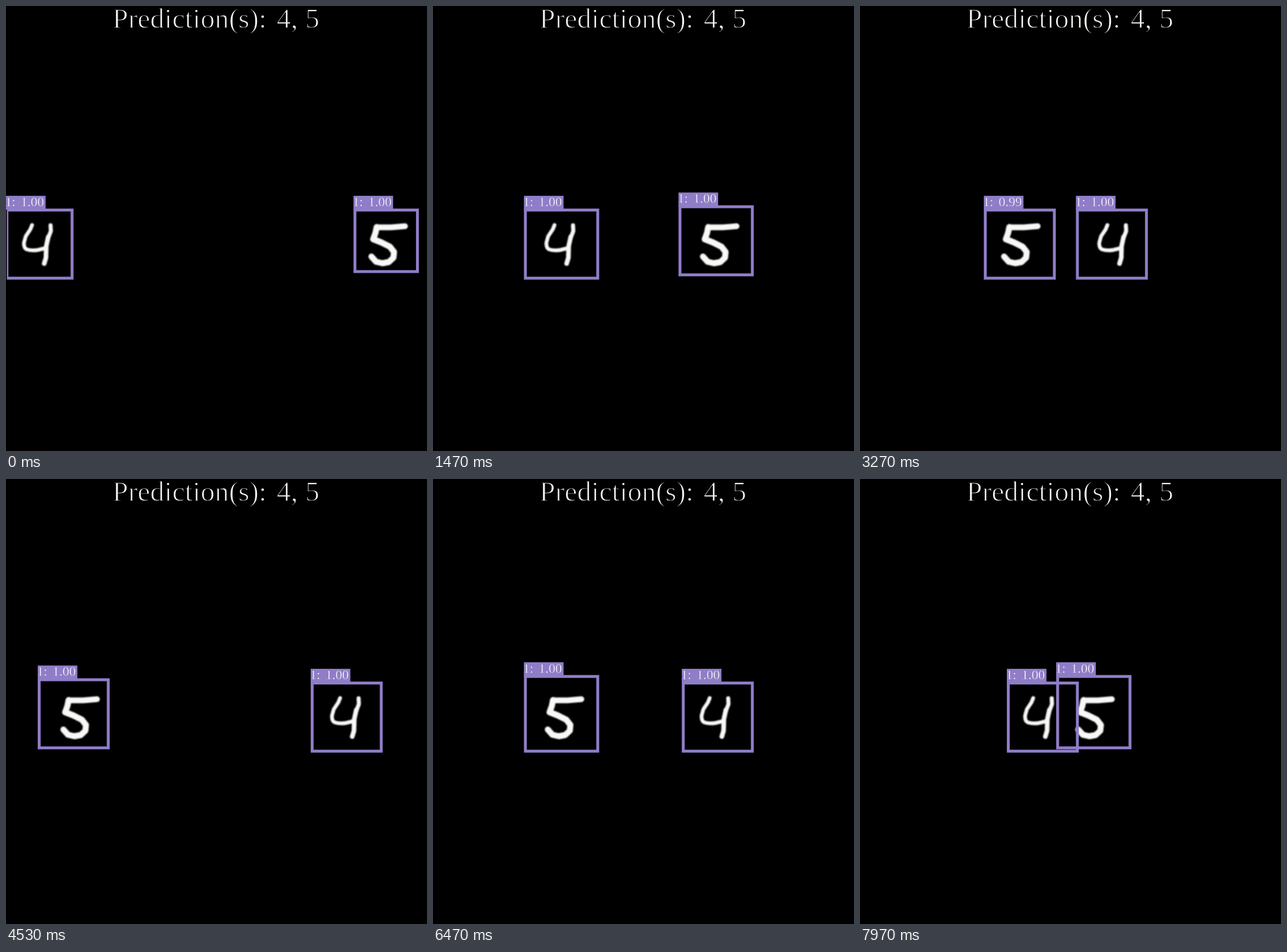
An HTML page for the animation above (8000 ms loop, 728 by 769 pixels).

```html
<!DOCTYPE html>
<html lang="en">
<head>
<meta charset="utf-8">
<title>Digit detection</title>
<style>
  html, body { margin: 0; width: 100%; height: 100%; overflow: hidden; background: #000; }
  svg { display: block; width: 100%; height: 100%; }
  text { font-family: "Liberation Serif", serif; fill: #f4f4f0; }
  /* a background-coloured outline thins the letter stems */
  .title { font-size: 49px; stroke: #000; stroke-width: 1.3; }
  .tag text { font-size: 23px; fill: #fff; stroke: #907dc8; stroke-width: 0.5; }
  .tag rect { fill: #907dc8; }
  .frame { fill: none; stroke: #907dc8; stroke-width: 5; }
  .ink path { fill: none; stroke: #f8f8f6; stroke-linecap: round; stroke-linejoin: round; }
</style>
</head>
<body>
<svg viewBox="0 0 728 769">
  <defs>
    <filter id="soft" x="-20%" y="-20%" width="140%" height="140%"><feGaussianBlur stdDeviation="0.9"/></filter>
    <clipPath id="stage"><rect x="1.5" width="726.5" height="769"/></clipPath>
  </defs>
  <rect width="728" height="769"/>
  <text class="title" y="38"><tspan x="184">Prediction(s):</tspan><tspan x="468">4,</tspan><tspan x="517.500">5</tspan></text>
  <g class="ink" id="four" filter="url(#soft)">
    <path stroke-width="6.500" d="M18.500 3.500L15.500 11L7.500 23L4.500 34Q4 43 9 45.500Q18 48.500 29 46.500L43 43"/>
    <path stroke-width="7" d="M50.500 4L51 14L46 27"/>
    <path stroke-width="8" d="M46.500 24L43 40L42.500 60L39.500 70"/>
  </g>
  <g class="ink" id="five" filter="url(#soft)">
    <path stroke-width="10" d="M15 7.500L40 7.500L64 5.500"/>
    <path stroke-width="10.500" d="M15 7L13 17L9 28L23 33.500L38 41L45 50L44 60L36 67.500L25 69.500L14 67L6 58"/>
  </g>
  <g id="boxes"></g>
</svg>
<script>
const LOOP = 8000, TICK = 1000 / 30;
const CELL = 728 / 128;            // detector grid spacing
const TOP = 352.6, BOTTOM = 470.3;

// step, then grid positions: left/right of "4", left/right/top/bottom of "5"
const KEYS = [
  [0,   -1,  20,  106, 125,  0, -2],
  [37,  28,  50,  75,  97,  -1, -1],
  [82,  66,  87,  38,  59,   0,  0],
  [113, 93,  114, 10,  31,  -1, -1],
  [134, 100, 120, 5,   27,  -1,  0],
  [162, 76,  97,  28,  50,  -2,  0],
  [199, 45,  66,  60,  82,  -2, -1]
];

const $ = id => document.getElementById(id);
const clamp = (v, lo, hi) => Math.min(hi, Math.max(lo, v));

function make(tag, parent, attrs = {}) {
  const el = document.createElementNS("http://www.w3.org/2000/svg", tag);
  for (const key in attrs) el.setAttribute(key, attrs[key]);
  return parent.appendChild(el);
}

function makeBox() {
  const clip = make("g", $("boxes"), { "clip-path": "url(#stage)" });
  const frame = make("rect", clip, { class: "frame" });
  const tag = make("g", $("boxes"), { class: "tag" });
  make("rect", tag, { y: -24.6, width: 68.5, height: 24 });
  make("text", tag, { x: -1.5, y: -6.6 }).textContent = "1:";
  const score = make("text", tag, { x: 25.5, y: -6.6 });
  return { frame, tag, score };
}

// Both digits cross the stage at constant speed and bounce off the walls.
const fourX = step => 19.6 + 4.837 * (125.8 - Math.abs(125.8 - Math.abs(step - 1.44)));
const fiveX = step => 652.5 - fourX(step);

// Box edges as offsets from the digit they follow.
const pads = KEYS.map(([step, l4, r4, l5, r5, top, bottom]) => {
  const a = fourX(step) / CELL, b = fiveX(step) / CELL;
  return [l4 - a, r4 - a, l5 - b, r5 - b, top, bottom];
});

function padsAt(step) {
  let i = 0;
  while (i < KEYS.length - 2 && step >= KEYS[i + 1][0]) i++;
  const f = (step - KEYS[i][0]) / (KEYS[i + 1][0] - KEYS[i][0]);
  return pads[i].map((v, j) => v + (pads[i + 1][j] - v) * f);
}

const boxes = [makeBox(), makeBox()];

function place(box, x, left, right, top, bottom, score) {
  const snap = pad => clamp(Math.round(x / CELL + pad), 0, 125) * CELL + 0.5;
  const l = Math.max(1.6, snap(left)), r = snap(right);
  const t = TOP + Math.round(top) * CELL, b = BOTTOM + Math.round(bottom) * CELL;
  const size = { x: l, y: t, width: r - l, height: b - t };
  for (const key in size) box.frame.setAttribute(key, size[key]);
  box.tag.setAttribute("transform", `translate(${Math.max(0, l - 2.5)} ${t})`);
  box.score.textContent = score;
}

function draw(time) {
  const n = Math.floor((time % LOOP + 4) / TICK);
  const step = Math.min(199, n - Math.floor((n + 3) / 6));   // every sixth tick holds
  const a = fourX(step), b = fiveX(step);
  const [l4, r4, l5, r5, top, bottom] = padsAt(step);
  $("four").setAttribute("transform", `translate(${a} 375)`);
  $("five").setAttribute("transform", `translate(${b} 375)`);
  place(boxes[0], a, l4, r4, 0, 0, "1.00");
  place(boxes[1], b, l5, r5, top, bottom, Math.abs(step - 82) < 3 ? "0.99" : "1.00");
}

const start = performance.now();
function loop() {
  draw(performance.now() - start);
  requestAnimationFrame(loop);
}
loop();
</script>
</body>
</html>
```
